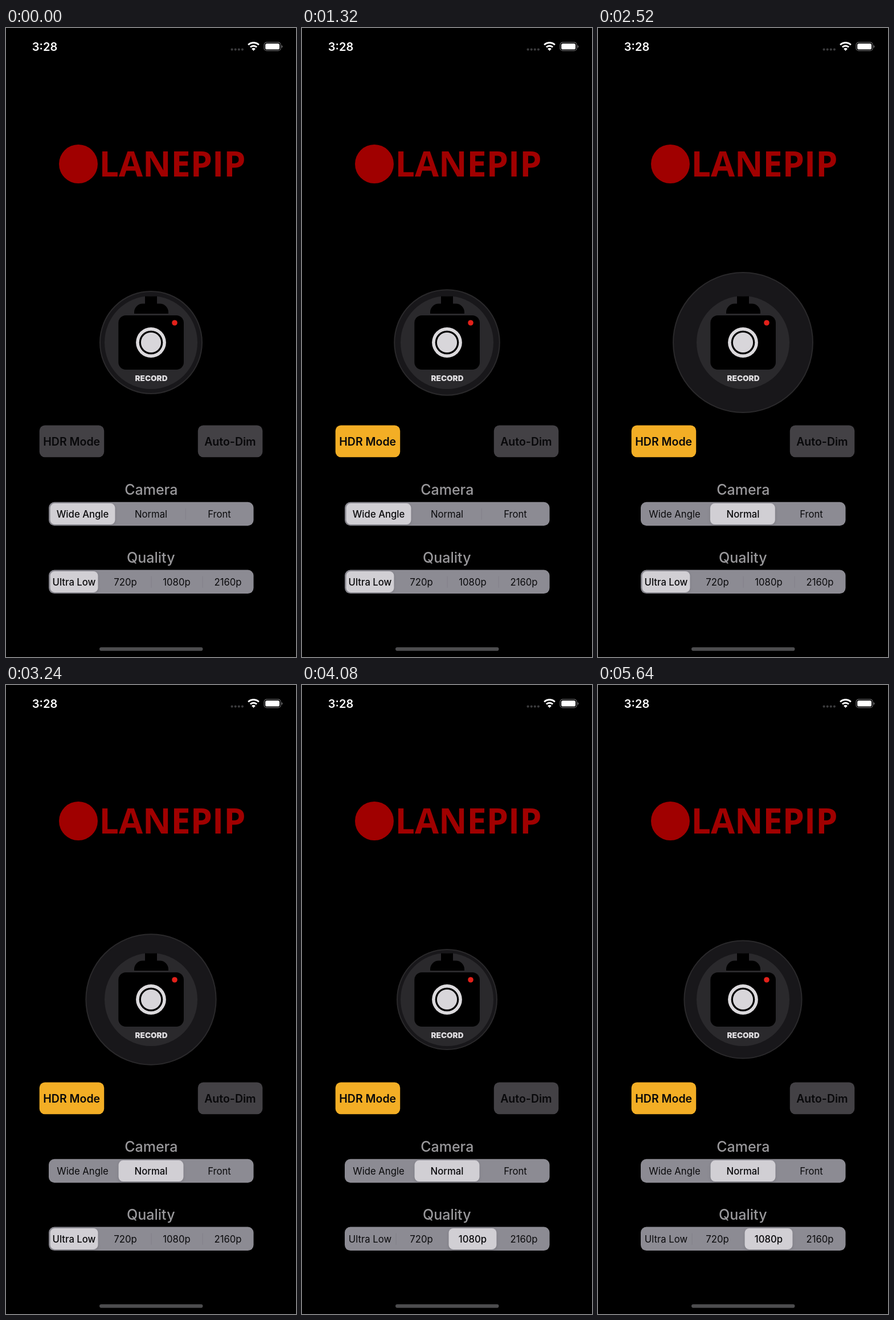
Write an HTML page that moves like this. It is 509 by 1101 pixels and loops after 5680 ms.

```html
<!DOCTYPE html>
<html lang="en">
<head>
<meta charset="utf-8">
<title>Recorder screen</title>
<style>
  html, body { margin: 0; width: 100%; height: 100%; overflow: hidden; background: #000; }
  svg { display: block; width: 509px; height: 1101px; font-family: Inter, "Liberation Sans", sans-serif; }
  text { text-anchor: middle; }
  .heading { font-size: 25px; font-weight: 500; fill: #99989b; }
  .button { font-size: 19.5px; font-weight: 600; fill: #08080a; }
  .segment { font-size: 16.7px; fill: #09090b; }
</style>
</head>
<body>
<svg id="stage" viewBox="0 0 509 1101">
  <defs>
    <filter id="shadow" x="-20%" y="-30%" width="140%" height="170%">
      <feDropShadow dx="0" dy="2" stdDeviation="2.5" flood-opacity=".14"/>
    </filter>
  </defs>
  <rect width="509" height="1101"/>

  <g id="status">
    <text x="68" y="40" font-size="20" font-weight="600" fill="#fff">3:28</text>
    <g fill="#3b3b3d">
      <circle cx="396.6" cy="37.6" r="2.1"/><circle cx="402.7" cy="37.6" r="2.1"/>
      <circle cx="408.8" cy="37.6" r="2.1"/><circle cx="414.9" cy="37.6" r="2.1"/>
    </g>
    <g fill="none" stroke="#fff" stroke-width="3">
      <path d="M425.2 29.5A13.4 13.4 0 0 1 443.8 29.5"/>
      <path d="M428.9 33.5A8.2 8.2 0 0 1 440.1 33.5"/>
    </g>
    <path d="M434.5 40L431.1 36.5A4.8 4.8 0 0 1 437.9 36.5Z" fill="#fff"/>
    <rect x="453.1" y="25.1" width="29" height="14.6" rx="4.3" fill="none" stroke="#6c6c6e" stroke-width="1.2"/>
    <rect x="455.2" y="27.2" width="24.8" height="10.4" rx="2.6" fill="#fff"/>
    <path d="M483.6 30A2.6 2.6 0 0 1 483.6 35Z" fill="#6c6c6e"/>
  </g>

  <g id="title" fill="#a00000">
    <circle cx="127" cy="238" r="34"/>
    <text x="292" y="260" font-family="'Open Sans', sans-serif" font-size="61" font-weight="700">LANEPIP</text>
  </g>

  <g id="record">
    <circle id="pulse" cx="254.5" cy="550.5" fill="#18171a" stroke="#2a292b" stroke-width="2"/>
    <circle cx="254.5" cy="550.5" r="81.5" fill="#2a292c"/>
    <path d="M244 469.5H265V482.5H270A15 15 0 0 1 285 497.5V500H225V497.5A15 15 0 0 1 240 482.5H244Z"/>
    <rect x="197.3" y="503" width="114.7" height="95" rx="13"/>
    <circle cx="254.5" cy="550.5" r="26.4" fill="#dcdadd"/>
    <circle cx="254.5" cy="550.5" r="20.8"/>
    <circle cx="254.5" cy="550.5" r="17.6" fill="#d8d6da"/>
    <circle cx="296" cy="516" r="4.8" fill="#e3211a"/>
    <text x="255" y="617.5" font-size="13.6" font-weight="900" fill="#dedcdf">RECORD</text>
  </g>

  <rect id="hdr" x="58.7" y="695.5" width="113.5" height="55.8" rx="9.5"/>
  <rect x="336.8" y="695.5" width="113.5" height="55.8" rx="9.5" fill="#434145"/>
  <text class="button" x="115.2" y="730.5">HDR Mode</text>
  <text class="button" x="393.4" y="730.5">Auto-Dim</text>

  <text class="heading" x="254.8" y="817">Camera</text>
  <text class="heading" x="254.3" y="936">Quality</text>
  <rect x="164" y="1084" width="181.5" height="6.2" rx="3.1" fill="#4c4c4e"/>
</svg>
<script>
const LOOP = 5680;
const HDR_ON = 960;
const SMALLEST = 612;
const HALF_PULSE = 2000;
const stage = document.getElementById('stage');
const pulse = document.getElementById('pulse');
const hdr = document.getElementById('hdr');
const clamp = v => Math.min(1, Math.max(0, v));

function add(tag, attrs, text = '') {
  const node = document.createElementNS('http://www.w3.org/2000/svg', tag);
  for (const key in attrs) node.setAttribute(key, attrs[key]);
  node.textContent = text;
  return stage.appendChild(node);
}

// Standard ease-in-out: cubic-bezier(.42, 0, .58, 1)
function easeInOut(x) {
  let low = 0, high = 1;
  for (let i = 0; i < 24; i++) {
    const s = (low + high) / 2, r = 1 - s;
    if (3 * r * r * s * .42 + 3 * r * s * s * .58 + s ** 3 < x) low = s; else high = s;
  }
  return low * low * (3 - 2 * low);
}

// Critically damped spring from 0 to 1
function spring(ms) {
  const x = Math.max(0, ms) * .018;
  return 1 - (1 + x) * Math.exp(-x);
}

function segmented(y, names, from, to, start) {
  const left = 75, width = 359.5, step = 360 / names.length;
  const center = i => 74.5 + step * (i + .5);
  const thumbWidth = step - 6.2;
  add('rect', { x: left, y, width, height: 41.5, rx: 10, fill: '#8c8b93' });
  const separators = names.slice(1).map((_, i) => add('rect', {
    x: 74.5 + step * (i + 1), y: y + 11, width: 1.2, height: 20, fill: '#83828b'
  }));
  const thumb = add('rect', {
    y: y + 2.3, width: thumbWidth, height: 37, rx: 8, fill: '#d1cfd4', filter: 'url(#shadow)'
  });
  const labels = names.map((name, i) =>
    add('text', { class: 'segment', x: center(i), y: y + 27.3 }, name));

  return t => {
    const x = center(from) + (center(to) - center(from)) * spring(t - start);
    const selected = t < start ? from : to;
    thumb.setAttribute('x', x - thumbWidth / 2);
    labels.forEach((label, i) => label.setAttribute('font-weight', i === selected ? 550 : 400));
    separators.forEach((line, i) => {
      const distance = Math.abs(x - 74.5 - step * (i + 1)) / step;
      line.setAttribute('opacity', clamp((distance - 1.2) / .28));
    });
  };
}

const showCamera = segmented(829.8, ['Wide Angle', 'Normal', 'Front'], 0, 1, 2110);
const showQuality = segmented(948.6, ['Ultra Low', '720p', '1080p', '2160p'], 0, 2, 3490);

function draw(t) {
  // The ring grows and shrinks, symmetric about its smallest moment
  const phase = Math.abs(t - SMALLEST) / HALF_PULSE % 2;
  const size = easeInOut(phase < 1 ? phase : 2 - phase);
  pulse.setAttribute('r', 81.5 + 41.1 * size);
  hdr.setAttribute('fill', t < HDR_ON ? '#434145' : '#f3ae25');
  showCamera(t);
  showQuality(t);
}

const begin = performance.now();
function tick() {
  draw((performance.now() - begin) % LOOP);
  requestAnimationFrame(tick);
}
draw(0);
tick();
</script>
</body>
</html>
```
